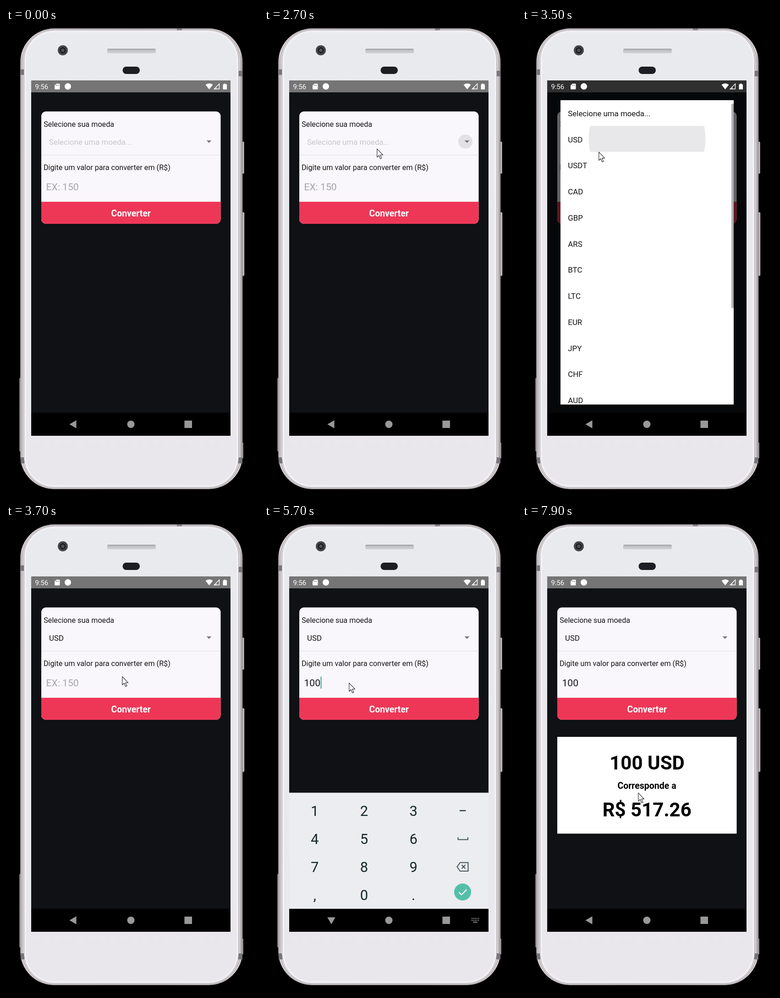
An HTML page for the animation above (8 s loop, 550 by 1018 pixels).

```html
<!DOCTYPE html>
<html lang="pt">
<head>
<meta charset="utf-8">
<title>Conversor de moedas</title>
<style>
  html, body { margin: 0; width: 100%; height: 100%; overflow: hidden; background: #000; }
  svg { display: block; width: 100%; height: 100%; }
  text { font-family: Roboto, "Open Sans", sans-serif; }
  .mid { text-anchor: middle; }
  .bold { font-weight: 700; }
</style>
</head>
<body>
<svg viewBox="0 0 550 1018" xmlns="http://www.w3.org/2000/svg">
  <defs>
    <clipPath id="screenClip"><rect x="55" y="114" width="435" height="723"/></clipPath>
    <clipPath id="cardClip"><rect x="77" y="181.5" width="391.5" height="244.5" rx="10"/></clipPath>
    <clipPath id="listClip"><rect x="84" y="157" width="378" height="662"/></clipPath>
    <clipPath id="rowClip"><rect x="84" y="213" width="378" height="56.5"/></clipPath>
    <linearGradient id="rim">
      <stop offset="0" stop-color="#8f898b"/><stop offset=".008" stop-color="#d9d2d5"/>
      <stop offset=".5" stop-color="#c8c2c5"/>
      <stop offset=".99" stop-color="#d4cdd0"/><stop offset="1" stop-color="#858082"/>
    </linearGradient>
    <linearGradient id="face" x2="0" y2="1">
      <stop offset="0" stop-color="#e9eaee"/><stop offset="1" stop-color="#e9e7ec"/>
    </linearGradient>
    <linearGradient id="grille" x2="0" y2="1">
      <stop offset="0" stop-color="#9c9c9e"/><stop offset=".4" stop-color="#c4c4c6"/><stop offset="1" stop-color="#d3d3d6"/>
    </linearGradient>
  </defs>
  <rect width="550" height="1018"/>

  <g id="phone">
    <rect x="29.5" y="761" width="4" height="160" rx="1.5" fill="#bdb7ba"/>
    <g fill="#c3bdc0" stroke="#858083" stroke-width=".8">
      <rect x="514" y="247.5" width="5.5" height="69" rx="1.5"/>
      <rect x="514" y="401" width="6" height="138" rx="1.5"/>
      <rect x="514" y="902" width="3.5" height="34" rx="1"/>
    </g>
    <rect x="31" y="1" width="485.5" height="1002" rx="74" fill="url(#rim)"/>
    <rect x="35.5" y="2.5" width="476.5" height="999" rx="70" fill="none" stroke="#a9a3a6"/>
    <g fill="#77757a">
      <rect x="32" y="90" width="8" height="12"/><rect x="507" y="93" width="9" height="12"/>
      <rect x="32" y="934" width="8" height="13"/><rect x="507" y="934" width="9" height="13"/>
      <rect x="373" y="1.5" width="11" height="5"/>
    </g>
    <rect x="39.5" y="5" width="468" height="994" rx="66" fill="url(#face)" stroke="#b4b0b4"/>
    <rect x="42" y="7.5" width="463" height="989" rx="63.5" fill="none" stroke="#f1f1f5" stroke-width="3.5"/>
    <circle cx="124" cy="48.5" r="11" fill="#45474b"/>
    <circle cx="124" cy="48.5" r="7" fill="#202226"/>
    <circle cx="124" cy="48.5" r="3.5" fill="#50545b"/>
    <rect x="221" y="45" width="106" height="10" rx="3" fill="url(#grille)"/>
    <rect x="254.5" y="84" width="37.5" height="16" rx="8" fill="#1d1e23"/>
  </g>

  <rect x="55" y="114" width="435" height="773" fill="#000"/>
  <rect x="55" y="140" width="435" height="697" fill="#0f1115"/>
  <rect x="55" y="114" width="435" height="26" fill="#757575"/>

  <g clip-path="url(#cardClip)">
    <rect x="77" y="181" width="392" height="245" fill="#f9f7fb"/>
    <rect x="77" y="276" width="392" height="1" fill="#e2e0e5"/>
    <rect x="77" y="378" width="392" height="48" fill="#ee3757"/>
    <rect id="press" x="77" y="378" width="392" height="48" fill="#000"/>
  </g>
  <g fill="#141416" font-size="16.2">
    <text x="82.2" y="214.5">Selecione sua moeda</text>
    <text x="81.9" y="308.5">Digite um valor para converter em (R$)</text>
  </g>
  <circle id="tap" cx="439.5" cy="247" r="15.5" fill="#000"/>
  <path d="M437.5 244.5h11l-5.500 5.500z" fill="#79777b"/>
  <text id="choice" x="94" y="253.5" font-size="16.9"></text>
  <text id="amount" x="87.5" y="352.5" font-size="21.1"></text>
  <rect id="caret" y="332" width="1.7" height="26" fill="#0d9a82"/>
  <text class="mid bold" x="272.7" y="410" font-size="19.4" fill="#fff">Converter</text>

  <g id="result" class="mid bold">
    <rect x="77" y="463" width="391.5" height="210.5" fill="#fff"/>
    <text x="273" y="534" font-size="42">100 USD</text>
    <text x="272.5" y="575.5" font-size="19.5">Corresponde a</text>
    <text x="272.8" y="636" font-size="42">R$ 517.26</text>
  </g>

  <rect id="dim" x="55" y="114" width="435" height="723" fill="#000"/>
  <g id="dialog">
    <rect x="84" y="157" width="378" height="662" fill="#fff"/>
    <g clip-path="url(#rowClip)"><circle id="rowTap" cx="273" cy="241" r="127.5" fill="#e8e7ea"/></g>
    <g id="list" clip-path="url(#listClip)" font-size="16.9" fill="#141416"></g>
    <rect x="457" y="165" width="5" height="444" fill="#b2b1b4"/>
  </g>

  <g id="status" fill="#fff">
    <text x="63.6" y="133" font-size="14.8">9:56</text>
    <path d="M110 121h6q1.500 0 1.500 1.500v9.500q0 1.500-1.500 1.500h-8.500q-1.500 0-1.500-1.500v-7z"/>
    <path d="M109.500 123v3m2.500-3v3m2.500-3v3" stroke="#757575"/>
    <circle cx="135" cy="127" r="7"/>
    <path d="M435.500 123.500q8-6 16 0l-8 10z"/>
    <path d="M454.500 132.500h11v-11z" fill="none" stroke="#fff" stroke-width="1.4"/>
    <path d="M453 133.500l7-7v7z" fill-opacity=".45"/>
    <path d="M475.500 121h4v1.500h2.500v11h-8.500v-11h2z"/>
  </g>

  <g clip-path="url(#screenClip)">
    <g id="keyboard">
      <rect x="55" y="584.5" width="435" height="345" fill="#ebedf0"/>
      <g id="keys" class="mid" font-size="31" fill="#14272b"></g>
      <path d="M427 623.500h13.500" stroke="#14272b" stroke-width="2.2"/>
      <g fill="none" stroke="#43535a" stroke-width="2">
        <path d="M423.500 681.500v5h21.500v-5"/>
        <path d="M428 736.500h17.500v18.500h-17.500l-6.500-9.250zM431.500 741.500l8 8m0-8l-8 8"/>
      </g>
      <circle cx="433.5" cy="800.5" r="18.5" fill="#54bfa9"/>
      <path d="M425.500 801l5.500 5.500 11.500-11.500" fill="none" stroke="#fff" stroke-width="2.2"/>
    </g>
  </g>

  <g id="nav" fill="#999">
    <path id="back" d="M-8.500 0L6.500-8.800V8.800z"/>
    <circle cx="272.5" cy="862" r="8"/>
    <rect x="389.5" y="854" width="16.5" height="16"/>
    <g id="imeIcon" fill="none" stroke="#999" stroke-width="1.8">
      <path d="M453 858h16M453 862h16" stroke-dasharray="2 1.5"/>
      <path d="M456.500 866h9"/>
    </g>
  </g>

  <path id="cursor" d="M.8.800V19l4.100-3.800 3.200 7.300 2.800-1.200-3.100-7.100h5.700z" fill="#fff" stroke="#333338" stroke-width="1.2" stroke-linejoin="round"/>
</svg>
<script>
const LOOP = 8000, STEP = 100;
const $ = id => document.getElementById(id);
const clamp = v => Math.max(0, Math.min(1, v));
const ramp = (t, a, b) => clamp((t - a) / (b - a));
const within = (t, a, b) => t >= a && t < b;
const attr = (id, name, value) => $(id).setAttribute(name, value);
const fade = (id, v) => attr(id, 'opacity', v);
const label = (x, y, s) => `<text x="${x}" y="${y}">${s}</text>`;

const coins = ['USD', 'USDT', 'CAD', 'GBP', 'ARS', 'BTC', 'LTC', 'EUR', 'JPY', 'CHF', 'AUD'];
$('list').innerHTML = label(100.3, 192, 'Selecione uma moeda...') +
  coins.map((c, i) => label(100.3, 248.5 + i * 56.75, c)).join('');
$('keys').innerHTML = [...'123456789,0.']
  .map((k, i) => label(110.7 + i % 3 * 107.7, 634.5 + Math.floor(i / 3) * 61.1, k)).join('');

// Pointer stops: time, x, y
const path = [
  [100, 440, 200], [900, 371, 284], [1000, 320, 455], [1300, 320, 455],
  [2200, 292, 271], [2300, 246, 265], [2400, 246, 265], [2500, 246, 262],
  [2700, 246, 262], [3300, 167, 269], [3500, 167, 269], [3700, 253, 331],
  [4000, 185, 345], [6100, 185, 345], [6500, 245, 380], [7000, 245, 380], [7900, 253, 584]
];

function pointer(t) {
  const i = path.findIndex(p => p[0] > t);
  if (i < 0) return path[path.length - 1].slice(1);
  if (i === 0) return path[0].slice(1);
  const [a, b] = [path[i - 1], path[i]], p = ramp(t, a[0], b[0]);
  return [a[1] + (b[1] - a[1]) * p, a[2] + (b[2] - a[2]) * p];
}

function drawForm(t) {
  const picked = t >= 3600;
  $('choice').textContent = picked ? 'USD' : 'Selecione uma moeda...';
  attr('choice', 'fill', picked ? '#141416' : '#c8c6ca');

  const typed = t < 5500 ? '' : t < 5700 ? '10' : '100';
  $('amount').textContent = typed || 'EX: 150';
  attr('amount', 'fill', typed ? '#141416' : '#a5a3a7');
  attr('caret', 'x', 88 + typed.length * 11.9);
  fade('caret', within(t, 4300, 5200) || within(t, 5500, 6600) ? 1 : 0);

  fade('press', 0.065 * ramp(t, 6500, 6600) * (1 - ramp(t, 6900, 7200)));
  fade('result', t >= 6700 ? 1 : 0);
}

function drawDialog(t) {
  const shown = ramp(t, 2700, 2950) * (1 - ramp(t, 3520, 3680));
  const size = t < 3300 ? 0.92 + 0.08 * shown : 1;
  fade('tap', within(t, 2700, 3000) ? 0.085 : 0);
  fade('dim', 0.6 * shown);
  fade('dialog', shown);
  attr('dialog', 'transform', `translate(273 488) scale(${size}) translate(-273 -488)`);
  fade('rowTap', within(t, 3500, 3700) ? 1 : 0);
}

function drawKeyboard(t) {
  const open = ramp(t, 4200, 4700), close = ramp(t, 6770, 7000);
  const drop = 90 * ((1 - open) ** 2 + close ** 2);
  fade('keyboard', clamp(open * 1.7) * clamp(1 - 1.7 * close ** 2));
  attr('keyboard', 'transform', `translate(0 ${drop})`);
  attr('back', 'transform', `translate(147 862) rotate(${-90 * open * (1 - close)})`);
  fade('imeIcon', within(t, 4400, 6700) ? 1 : 0);
}

function draw(t) {
  drawForm(t);
  drawDialog(t);
  drawKeyboard(t);
  attr('cursor', 'transform', `translate(${pointer(t).join(' ')})`);
  fade('cursor', t >= 100 ? 1 : 0);
}

const start = performance.now();
function tick() {
  const t = (performance.now() - start) % LOOP;
  draw(Math.floor(t / STEP) * STEP);
  requestAnimationFrame(tick);
}
tick();
</script>
</body>
</html>
```
